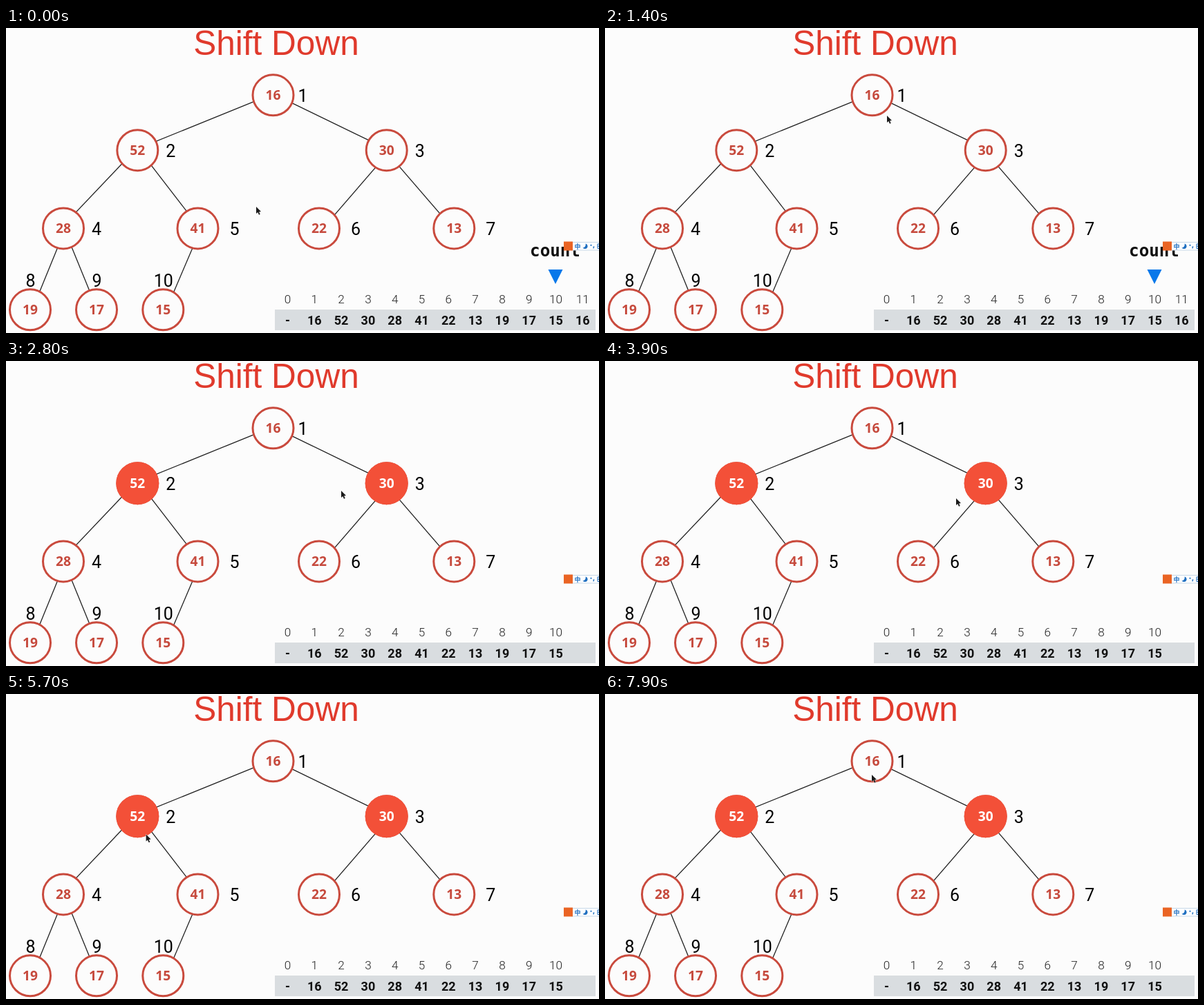
Recreate the animation shown at these times as an HTML page. Size 858x442 px, loop 8 s.

```html
<!DOCTYPE html>
<html lang="en">
<head>
<meta charset="utf-8">
<title>Shift Down</title>
<style>
  html, body { margin: 0; width: 100%; height: 100%; overflow: hidden; background: #fcfcfc; }
  svg { display: block; width: 858px; height: 442px; }
  text { text-anchor: middle; font-family: Roboto, "Liberation Sans", sans-serif; }
  .title { font: 49.5px "Liberation Sans", Arial, sans-serif; fill: #e03a2c; }
  .edge { stroke: #222; stroke-width: 1.3; }
  .ring { fill: #fcfcfc; stroke: #c94a3d; stroke-width: 3; }
  .disc { fill: #f35038; }
  .value { font: 700 19.2px "Open Sans", sans-serif; fill: #c64a3d; }
  .lit { fill: #fff; }
  .label { font-size: 25px; fill: #000; }
  .index { font-size: 17.2px; font-weight: 300; fill: #222; }
  .cell { font-size: 18px; font-weight: 700; fill: #111; }
  .count { font: 700 24.2px "DejaVu Sans Mono", monospace; fill: #111; }
  .ime { font: 700 9px "Noto Sans CJK SC", "Noto Sans CJK", sans-serif; fill: #1f6fc0; }
</style>
</head>
<body>
<svg viewBox="0 0 858 442">
  <rect width="858" height="442" fill="#fcfcfc"/>
  <text class="title" x="391" y="39">Shift Down</text>
  <g id="tree"></g>
  <g id="lit"></g>
  <rect x="389" y="408" width="464" height="30" fill="#d9dde0"/>
  <g id="table"></g>
  <g id="extra">
    <text class="count" x="794.5" y="331">count</text>
    <path d="M784.5 350H805.5L795 371Z" fill="#0878ea"/>
  </g>
  <g fill="#1f6fc0">
    <rect x="818.5" y="310.5" width="45" height="11.5" fill="#fbfdff" stroke="#c9d9e8"/>
    <rect x="807" y="309.5" width="13" height="13" fill="#ea6424"/>
    <text class="ime" x="827" y="320">中</text>
    <path d="M838.6 312.6A3.8 3.8 0 1 1 834.6 318.4A4.6 4.6 0 0 0 838.6 312.6Z"/>
    <circle cx="846.5" cy="314.8" r="1.1"/>
    <path d="M849.5 316.5h2l-1 3h-1z"/>
    <path d="M860 313H856V319.5H860M856 316.2H860" fill="none" stroke="#1f6fc0"/>
  </g>
  <path id="pointer" d="M0 0V10L2.3 8 4 11.8 5.7 11 4.1 7.4 7 7Z"
        fill="#1a1a1a" stroke="#fff" stroke-width=".8" paint-order="stroke"/>
</svg>
<script>
const LOOP = 8000, STEP = 100, RADIUS = 29.5;
const $ = id => document.getElementById(id);
const tree = $("tree"), lit = $("lit"), table = $("table"), extra = $("extra");

function add(parent, tag, attrs, content = "") {
  const el = document.createElementNS("http://www.w3.org/2000/svg", tag);
  for (const key in attrs) el.setAttribute(key, attrs[key]);
  el.textContent = content;
  return parent.appendChild(el);
}

const heap = [16, 52, 30, 28, 41, 22, 13, 19, 17, 15];
const columns = [386.5, 190.3, 550.7, 83, 277.5, 453, 648.3, 35, 131, 227.3];
const nudges = [0, -5, 4, -4, 3, 5.5, -2, 3, 1, 4.5]; // sideways shift of the edge above
const levels = [97.3, 177.2, 290.4, 408.3];

const nodes = heap.map((value, i) => {
  const depth = Math.floor(Math.log2(i + 1));
  return { value, x: columns[i], y: levels[depth], leaf: depth === 3 };
});

function addDisc(parent, kind, { value, x, y }, r) {
  add(parent, "circle", { class: kind, cx: x, cy: y, r });
  add(parent, "text", { class: `value ${kind === "disc" ? "lit" : ""}`, x, y: y + 7 }, value);
}

nodes.slice(1).forEach((node, i) => {
  const up = nodes[i >> 1], dx = nudges[i + 1];
  add(tree, "line", { class: "edge", x1: up.x + dx, y1: up.y, x2: node.x + dx, y2: node.y });
});
nodes.forEach((node, i) => {
  const { x, y, leaf } = node;
  const side = 43 + 5 * Math.floor((i + 2) / 3);
  addDisc(tree, "ring", node, RADIUS);
  add(tree, "text", { class: "label", x: leaf ? x + 0.5 : x + side, y: leaf ? y - 33.5 : y + 9.5 }, i + 1);
});
nodes.slice(1, 3).forEach(node => addDisc(lit, "disc", node, RADIUS + 1.5));

["-", ...heap, heap[0]].forEach((value, i) => {
  const parent = i > heap.length ? extra : table, x = 407.5 + i * 38.8;
  add(parent, "text", { class: "index", x, y: 399 }, i);
  add(parent, "text", { class: "cell", x, y: 430.2 }, value);
});

// stops of the pointer tip: time, x, y
const stops = [
  [300, 362, 259], [1400, 408, 127], [2000, 420, 161], [2800, 485, 188],
  [3200, 485, 188], [3700, 508, 199], [3900, 508, 199], [5600, 203, 200],
  [6400, 200, 228], [6700, 200, 228], [7000, 170, 202], [7600, 386, 117]
];

const ramp = (t, from, to) => Math.min(1, Math.max(0, (t - from) / (to - from)));

function pointAt(t) {
  const next = stops.findIndex(s => s[0] > t);
  const i = next < 0 ? stops.length - 1 : Math.max(1, next);
  const [t0, x0, y0] = stops[i - 1], [t1, x1, y1] = stops[i];
  const k = ramp(t, t0, t1);
  return [x0 + (x1 - x0) * k, y0 + (y1 - y0) * k];
}

function draw(now) {
  const t = Math.floor((now % LOOP) / STEP) * STEP;
  $("pointer").setAttribute("transform", `translate(${pointAt(t)})`);
  extra.setAttribute("opacity", 1 - ramp(t, 1500, 1800));
  lit.setAttribute("opacity", ramp(t, 1600, 1900));
}

const start = performance.now();
function tick() {
  draw(performance.now() - start);
  requestAnimationFrame(tick);
}
tick();
</script>
</body>
</html>
```
